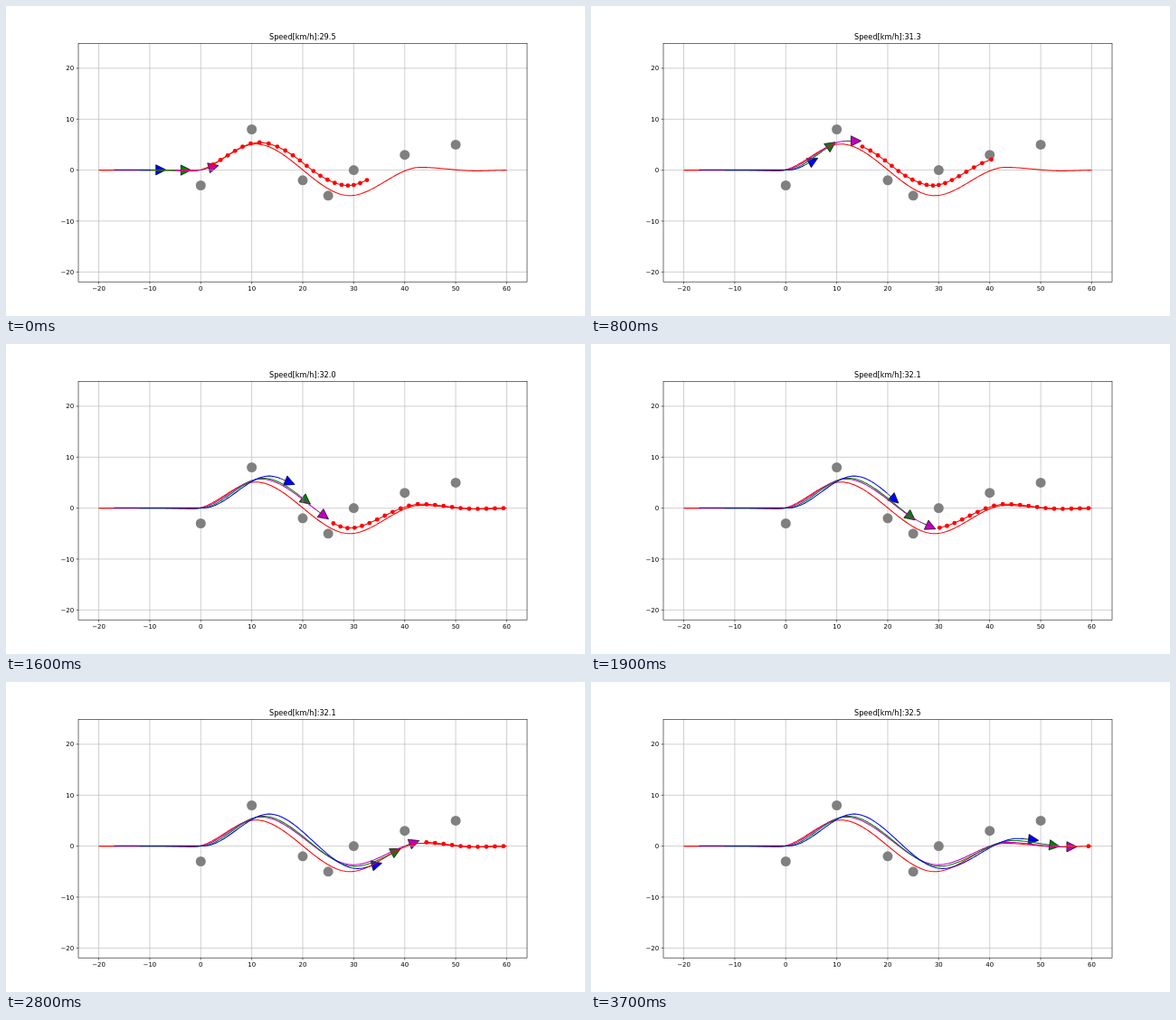
An HTML page that plays this animation: 640 by 343 pixels, repeating every 3.8 s.

```html
<!DOCTYPE html>
<html>
<head>
<meta charset="utf-8">
<style>
html, body { margin: 0; width: 100%; height: 100%; overflow: hidden; background: #fff; }
svg { display: block; width: 640px; height: 343px; font: 6.94px "DejaVu Sans", sans-serif; }
</style>
</head>
<body>
<svg id="plot" viewBox="0 0 640 343"></svg>
<script>
const plot = document.getElementById('plot');
const LEFT = 80, RIGHT = 576, TOP = 41.3, BOTTOM = 305.2;
const UNIT = (RIGHT - LEFT) / 88;
const FRAMES = 38, STEP = 100;
const px = x => LEFT + (x + 24) * UNIT, py = y => 181.6 - y * UNIT;
const point = (x, y) => px(x).toFixed(2) + ',' + py(y).toFixed(2);

function add(tag, attrs, text) {
  const el = document.createElementNS('http://www.w3.org/2000/svg', tag);
  for (const k in attrs) el.setAttribute(k, attrs[k]);
  if (text) el.textContent = text;
  return plot.appendChild(el);
}

const smooth = t => t * t * (3 - 2 * t);
const linear = t => t;

// Function through its turning points, constant outside them
const through = (ease, ...keys) => x => {
  const i = keys.findIndex(k => k[0] > x);
  if (i < 0) return keys[keys.length - 1][1];
  if (i === 0) return keys[0][1];
  const [x0, y0] = keys[i - 1], [x1, y1] = keys[i];
  return y0 + (y1 - y0) * ease((x - x0) / (x1 - x0));
};

const slope = (f, x) => (f(x + .01) - f(x - .01)) / .02;

// The x reached after going a distance along a curve
function travel(f, x, distance) {
  for (let left = distance; left > 0; left -= .05)
    x += Math.min(.05, left) / Math.hypot(1, slope(f, x));
  return x;
}

function trace(f, from, to) {
  const n = Math.ceil((to - from) * 4);
  return Array.from({ length: n + 1 }, (_, i) => {
    const x = from + (to - from) * i / n;
    return point(x, f(x));
  }).join(' ');
}

const course = through(smooth, [-8, 0], [-1.5, -.15], [10.8, 5.12], [29.2, -5], [43.1, .55], [54, -.15], [60, 0]);
const cars = [
  { color: '#bf00bf', tail: -7, start: .6, speed: 1.58,
    path: through(smooth, [-.7, 0], [11.8, 5.72], [29.9, -3.65], [43.5, .75], [54, -.12]) },
  { color: '#008000', tail: -12, start: -4.9, speed: 1.653,
    path: through(smooth, [0, 0], [12.2, 5.88], [30.2, -3.95], [44.6, 1.1], [54, .1]) },
  { color: '#0000ff', tail: -17, start: -9.8, speed: 1.7,
    path: through(smooth, [.6, .05], [13.4, 6.3], [30.7, -4.4], [45.5, 1.5], [54, .2]) }
];

// Planned path: even steps along the course, shifted sideways; replanned after REPLAN
const REPLAN = 8;
const earlyShift = through(smooth, [6, 0], [20, 1.1], [30, 2]);
const lateShift = through(smooth, [6, 0], [20, 1.1], [30, 1.05], [43, .25], [53, 0]);
const stops = Array.from({ length: FRAMES }, (_, i) => travel(course, 2.43, i * 1.682));

function planned(frame, i) {
  const x = stops[i], m = slope(course, x);
  const d = (frame > REPLAN ? lateShift : earlyShift)(x) / Math.hypot(1, m);
  return [x - d * m, course(x) + d];
}

const horizon = frame => frame + 22 - (frame > REPLAN ? 0 : Math.round(3 * frame / REPLAN));
const speed = through(linear, [0, 29.5], [8, 31.3], [12, 31.9], [19, 32.1], [24, 32.3], [28, 32.1], [37, 32.5]);

// Layers, bottom to top
for (const car of cars) {
  car.shaft = add('path', { stroke: '#000', 'stroke-width': .8 });
  car.head = add('path', { fill: car.color, stroke: '#000', 'stroke-width': .7 });
}
const grid = { stroke: '#b0b0b0', 'stroke-width': .6 }, tick = { stroke: '#000', 'stroke-width': .56 };
for (let v = -20; v <= 60; v += 10) {
  const label = String(v).replace('-', '\u2212'), x = px(v), y = py(v);
  add('path', { d: `M${x} ${TOP}V${BOTTOM}`, ...grid });
  add('path', { d: `M${x} ${BOTTOM}v2.4`, ...tick });
  add('text', { x, y: 315.4, 'text-anchor': 'middle' }, label);
  if (v > 20) continue;
  add('path', { d: `M${LEFT} ${y}H${RIGHT}`, ...grid });
  add('path', { d: `M${LEFT} ${y}h-2.4`, ...tick });
  add('text', { x: 75.2, y: y + 2.6, 'text-anchor': 'end' }, label);
}
for (const [x, y] of [[0, -3], [10, 8], [20, -2], [25, -5], [30, 0], [40, 3], [50, 5]])
  add('circle', { cx: px(x), cy: py(y), r: 5.5, fill: '#808080' });

const line = color => add('polyline', { fill: 'none', stroke: color, 'stroke-width': 1.05, 'stroke-linejoin': 'round' });
line('#f00').setAttribute('points', trace(course, -20, 60));
const plan = line('#f00');
const dots = stops.map(() => add('circle', { r: 2.4, fill: '#f00' }));
for (const car of cars) car.trail = line(car.color);
add('rect', { x: LEFT, y: TOP, width: RIGHT - LEFT, height: BOTTOM - TOP, fill: 'none', ...tick });
const title = add('text', { x: 327.8, y: 36.9, 'text-anchor': 'middle', 'font-size': 8.2 });

function drawCar({ path, start, speed, tail, shaft, head, trail }, frame) {
  const x = travel(path, start, speed * frame), y = path(x);
  const yaw = Math.atan(slope(path, x)), c = Math.cos(yaw), s = Math.sin(yaw);
  const at = (along, side) => point(x + along * c - side * s, y + along * s + side * c);
  shaft.setAttribute('d', `M${at(0, 0)}L${at(1, 0)}`);
  head.setAttribute('d', `M${at(1, 1)}L${at(3, 0)}L${at(1, -1)}Z`);
  trail.setAttribute('points', trace(path, tail, x));
}

function draw(frame) {
  const spots = stops.map((_, i) => planned(frame, i));
  const shown = i => i >= frame && i < horizon(frame);
  dots.forEach((dot, i) => {
    dot.setAttribute('visibility', shown(i) ? 'visible' : 'hidden');
    dot.setAttribute('cx', px(spots[i][0]));
    dot.setAttribute('cy', py(spots[i][1]));
  });
  plan.setAttribute('points', spots.filter((_, i) => shown(i)).map(p => point(...p)).join(' '));
  cars.forEach(car => drawCar(car, frame));
  title.textContent = `Speed[km/h]:${speed(frame).toFixed(1)}`;
}

const begin = performance.now();
let last = -1;
function loop() {
  const frame = Math.floor((performance.now() - begin) / STEP) % FRAMES;
  if (frame !== last) draw(last = frame);
  requestAnimationFrame(loop);
}
loop();
</script>
</body>
</html>
```
